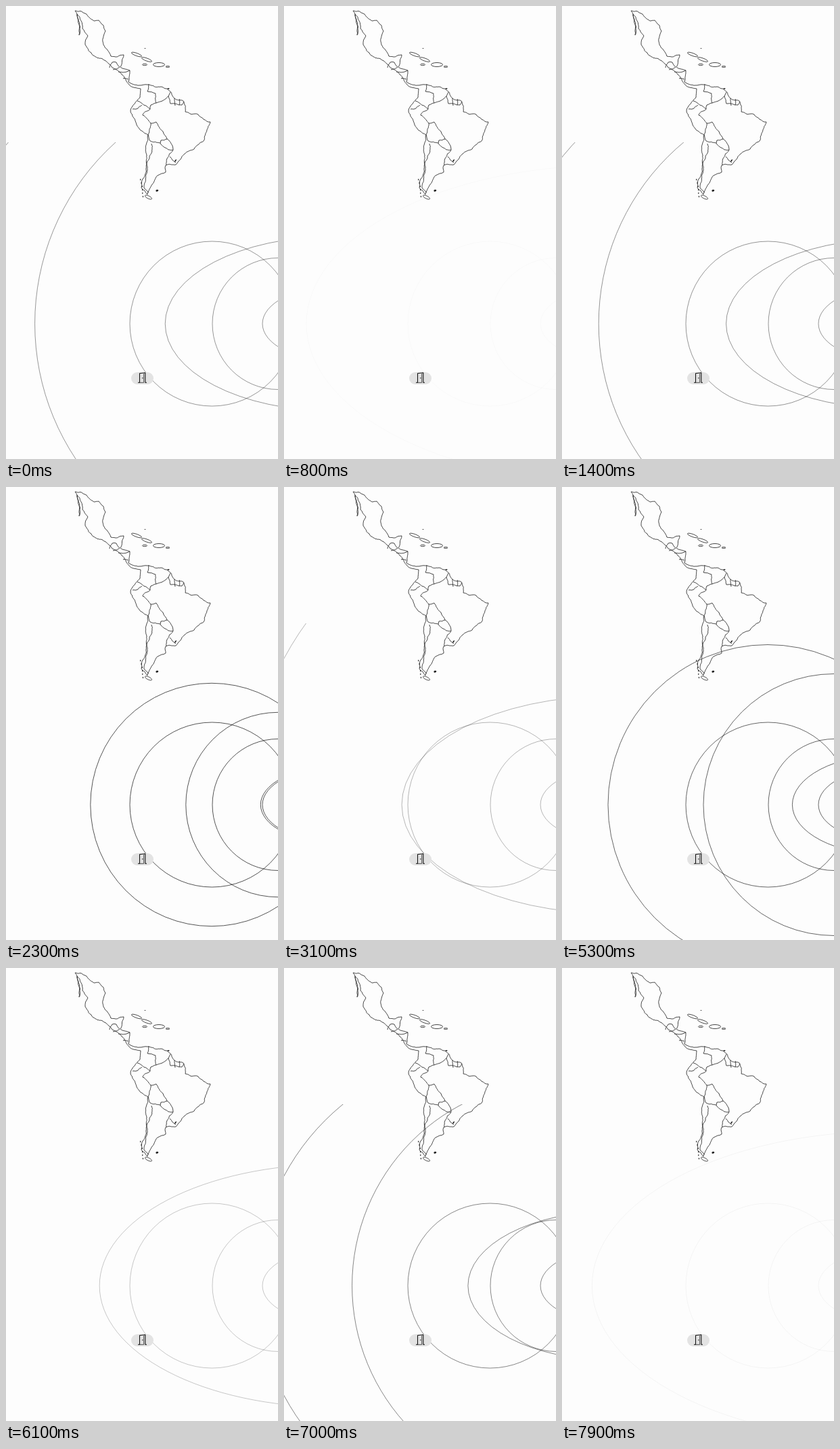
Write an HTML page with a canvas that moves like this. It is 402x668 px and loops after 8000 ms.

```html
<!DOCTYPE html>
<html lang="en">
<head>
<meta charset="utf-8">
<title>Pulse map</title>
<style>
html, body { margin: 0; width: 100%; height: 100%; overflow: hidden; background: #fdfdfd; }
canvas { display: block; width: 402px; height: 668px; }
</style>
</head>
<body>
<canvas id="stage"></canvas>
<script>
const W = 402, H = 668, LOOP = 8000, TAU = Math.PI * 2;
const PERIOD = 1429, LEAD = 590, HORIZON = 201, MID = 468.5;
const GROWTH = 0.4, SQUASH = 0.52;
const canvas = document.getElementById('stage');
const ctx = canvas.getContext('2d');
const dpr = window.devicePixelRatio || 1;
canvas.width = W * dpr;
canvas.height = H * dpr;

let seed = 7;
function rnd() {
  seed = (seed * 16807) % 2147483647;
  return seed / 2147483647 - 0.5;
}

// Splits a run at a displaced midpoint until the pieces are short
function jag(path, x0, y0, x1, y1) {
  const dx = x1 - x0, dy = y1 - y0;
  if (Math.hypot(dx, dy) < 3.5) return path.lineTo(x1, y1);
  const k = rnd() * 0.22;
  const mx = (x0 + x1) / 2 - dy * k, my = (y0 + y1) / 2 + dx * k;
  jag(path, x0, y0, mx, my);
  jag(path, mx, my, x1, y1);
}

function trace(path, points) {
  const pts = points.split(' ').map(p => p.split(',').map(Number));
  path.moveTo(...pts[0]);
  for (let i = 1; i < pts.length; i++) jag(path, ...pts[i - 1], ...pts[i]);
}

function blob(path, x, y, rx, ry, tilt = 0) {
  path.moveTo(x + rx * Math.cos(tilt), y + rx * Math.sin(tilt));
  path.ellipse(x, y, rx, ry, tilt, 0, TAU);
}

const land = new Path2D(), islets = new Path2D();

// Key points of the shores: Caribbean, Pacific, Atlantic
trace(land, '102,7 119,12 130,22 137,21 147,37 144,57 155,74 174,72 169,90 183,95 181,112 197,117 209,116 238,122 249,136 262,140 265,156 284,160 302,171 292,199 278,211 264,218 251,234 236,235 236,245 224,250 216,263 209,278');
trace(land, '102,7 106,18 108,43 105,12 113,33 121,44 117,57 129,73 153,86 171,101 182,116 199,122 198,135 184,155 193,175 210,190 208,220 202,255 200,268 209,278');

// Inland borders
[
  '153,91 157,83 163,83 168,90 158,94',
  '166,97 183,95', '173,107 181,108',
  '211,115 209,126 221,129 222,143 214,146 213,152 194,140',
  '187,152 195,151 201,146',
  '213,152 202,161 214,173 210,190',
  '214,173 222,171 232,185 238,196 229,198 228,202 213,199 210,190',
  '215,203 208,233 204,268 211,275',
  '228,202 240,212 247,212 246,206 238,196',
  '247,212 238,225 237,235', '242,222 251,231',
  '222,143 231,140 240,133 243,127',
  '240,133 243,144 260,146 263,141',
  '249,136 250,147', '256,137 256,146'
].forEach(line => trace(land, line));

// Cuba, Jamaica, Hispaniola, Puerto Rico, Tierra del Fuego
blob(land, 193, 71.5, 8, 2, 0.35);
blob(land, 208, 79, 8, 2, 0.35);
blob(land, 205, 86.5, 3.5, 1.2);
blob(land, 226, 86.5, 8.5, 3);
blob(land, 239, 89.5, 3, 0.9);
blob(land, 210.5, 282, 5.5, 2, 0.45);

// Small dark islands, with a loose chain off the south-west shore
blob(islets, 223.3, 272.2, 2, 1.4, -0.3);
blob(islets, 250.5, 228, 2.2, 0.9, -0.9);
blob(islets, 240, 121.8, 1.6, 0.9);
blob(islets, 205.5, 62.5, 0.9, 0.6);
for (let y = 256; y < 282; y += 5) blob(islets, 199 + (y - 256) * 0.15 + rnd() * 2, y, 0.6, 1.3);

function ring(cx, rx, ry = rx) {
  ctx.beginPath();
  ctx.ellipse(cx, MID, rx, ry, 0, 0, TAU);
  ctx.stroke();
}

function drawRings(t) {
  const age = (t + LEAD) % PERIOD;
  const grow = GROWTH * (age - LEAD);
  const oval = 247 + grow * 0.632;
  ctx.save();
  ctx.beginPath();
  ctx.rect(0, HORIZON, W, H - HORIZON);
  ctx.clip();
  ctx.lineWidth = 1;
  ctx.strokeStyle = `rgba(0,0,0,${0.68 * (1 - age / PERIOD)})`;
  ring(304.5, 121.5);
  ring(402, 97);
  ring(482.5, 103.5, 103.5 * SQUASH);
  ring(304, 402 + grow);
  ring(402, 359 + grow);
  ring(482.5, oval, oval * SQUASH);
  ctx.restore();
}

function drawMap() {
  ctx.lineJoin = 'round';
  ctx.strokeStyle = '#333';
  ctx.lineWidth = 0.9;
  ctx.stroke(land);
  ctx.fillStyle = '#222';
  ctx.fill(islets);
}

const doorway = new Path2D('M195 555.3H197.5V541.8L205.8 540.8V555.3H208');
const leaf = new Path2D('M197.5 555.3H203.6V542');

function drawDoor() {
  ctx.fillStyle = '#e3e3e3';
  ctx.beginPath();
  ctx.roundRect(185, 540, 33, 18, 9);
  ctx.fill();
  ctx.strokeStyle = ctx.fillStyle = '#111';
  ctx.lineWidth = 1.1;
  ctx.stroke(doorway);
  ctx.lineWidth = 0.7;
  ctx.stroke(leaf);
  ctx.fillRect(201.3, 547.8, 1, 1.6);
}

function frame(now) {
  ctx.setTransform(dpr, 0, 0, dpr, 0, 0);
  ctx.fillStyle = '#fdfdfd';
  ctx.fillRect(0, 0, W, H);
  drawRings(now % LOOP);
  drawMap();
  drawDoor();
  requestAnimationFrame(frame);
}
frame(performance.now());
</script>
</body>
</html>
```
